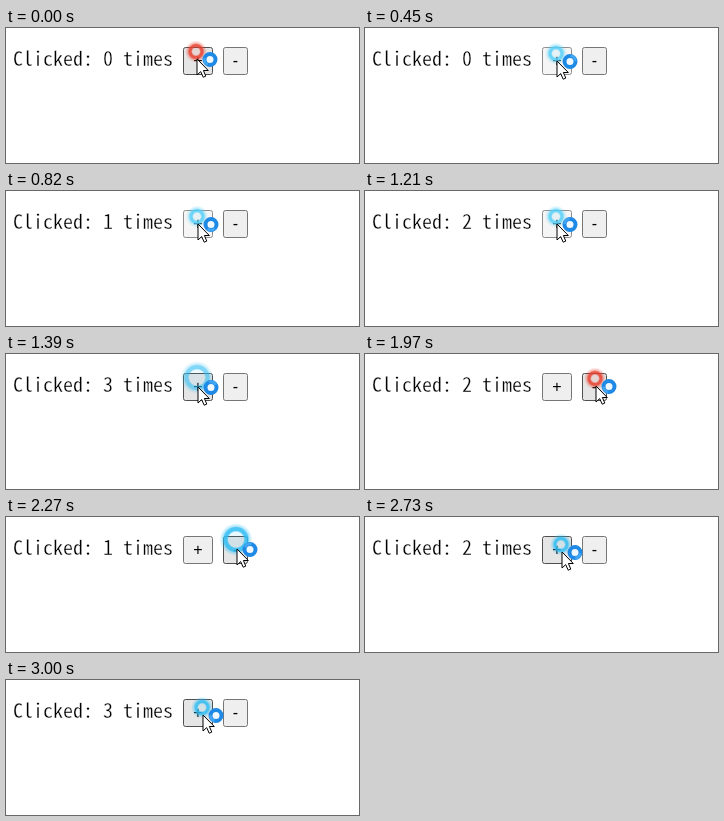
Recreate the animation shown at these times as an HTML page with a canvas. Size 353 by 135 pixels, loop 3.03 s.

```html
<!DOCTYPE html>
<html lang="en">
<head>
<meta charset="utf-8">
<title>Counter</title>
<style>
html, body { margin: 0; width: 100%; height: 100%; overflow: hidden; background: #fff; }
canvas { display: block; width: 353px; height: 135px; }
</style>
</head>
<body>
<canvas id="stage" width="353" height="135"></canvas>
<script>
const ctx = document.getElementById('stage').getContext('2d');
const LOOP = 3030;
const MONO = '"Noto Sans Mono CJK JP", "Noto Sans Mono", monospace';
const FADE = 200;

// Press time, release time, step added to the counter on release
const clicks = [
  [430, 525, 1], [810, 905, 1], [1200, 1290, 1], [1660, 1755, -1],
  [2130, 2225, -1], [2630, 2715, 1], [2900, 2985, 1]
];

// Pointer tip: time, x, y
const path = [
  [0, 191, 31], [150, 191, 31], [300, 192, 33], [1380, 192, 33], [1600, 229, 32],
  [1760, 229, 32], [1860, 231, 32], [2330, 231, 32], [2540, 197, 35], [LOOP, 197, 35]
];

const looks = {
  idle: { fill: '#efefef', edge: '#767676' },
  hover: { fill: '#e5e5e5', edge: '#4f4f4f' },
  down: { fill: '#f5f5f5', edge: '#8d8d8d' }
};

const ease = u => u * u * (3 - 2 * u);
const clamp = u => Math.max(0, Math.min(1, u));

// Keep the 10px advance whichever mono face is available.
ctx.font = '20px ' + MONO;
const textFont = '300 ' + (200 / ctx.measureText('0').width) + 'px ' + MONO;

function pointerAt(t) {
  const i = Math.max(1, path.findIndex(p => p[0] > t));
  const [a, b] = [path[i - 1], path[i]];
  const u = ease((t - a[0]) / (b[0] - a[0]));
  return [1, 2].map(k => Math.round(a[k] + (b[k] - a[k]) * u));
}

function label(text) {
  ctx.font = textFont;
  ctx.textAlign = 'left';
  ctx.fillStyle = '#000';
  ctx.fillText(text, 7, 38);
  // A hairline in the page colour thins the strokes.
  ctx.strokeStyle = '#fff';
  ctx.lineWidth = 0.35;
  ctx.lineJoin = 'round';
  ctx.strokeText(text, 7, 38);
}

function button(x, w, sign, px, down) {
  const over = px >= x && px < x + w;
  const look = looks[over ? (down ? 'down' : 'hover') : 'idle'];
  ctx.beginPath();
  ctx.roundRect(x + 0.5, 19.5, w - 1, 27, 2);
  ctx.fillStyle = look.fill;
  ctx.fill();
  ctx.strokeStyle = look.edge;
  ctx.lineWidth = 1;
  ctx.stroke();
  ctx.fillStyle = '#000';
  ctx.font = '16px "Liberation Sans", Arial, sans-serif';
  ctx.textAlign = 'center';
  ctx.fillText(sign, x + w / 2, 38);
}

// Ring with a soft glow; grow runs from 0 (small) to 1 (burst).
function halo(x, y, grow, rgb, alpha) {
  const inner = 3.5 + 4 * grow, outer = 11 + 5.5 * grow;
  const g = ctx.createRadialGradient(x, y, 0, x, y, outer);
  const stop = (r, a) => g.addColorStop(r / outer, `rgba(${rgb},${a * alpha})`);
  stop(0, 0.08);
  stop(inner, 0.12);
  stop(inner + 1.4, 0.85);
  stop(inner + 3.4 + grow, 0.85);
  stop(inner + 4.8 + grow, 0.35);
  stop(outer, 0);
  ctx.fillStyle = g;
  ctx.beginPath();
  ctx.arc(x, y, outer, 0, Math.PI * 2);
  ctx.fill();
}

function spinner(x, y, t) {
  const arc = (w, color, from, to) => {
    ctx.beginPath();
    ctx.arc(x, y, 5.5, from, to);
    ctx.lineWidth = w;
    ctx.strokeStyle = color;
    ctx.stroke();
  };
  const a = t / LOOP * Math.PI * 6 + 2;
  ctx.fillStyle = '#eef8fe';
  ctx.beginPath();
  ctx.arc(x, y, 4, 0, Math.PI * 2);
  ctx.fill();
  arc(4, '#1f8ae6', 0, Math.PI * 2);
  arc(2.6, 'rgba(90,185,250,0.6)', a, a + 1.4);
}

function arrow(x, y) {
  const pts = [[0, 0], [0, 16], [3.7, 12.6], [6.2, 18.2], [8.8, 17.1], [6.4, 11.5], [11.3, 11.5]];
  ctx.beginPath();
  pts.forEach(([dx, dy]) => ctx.lineTo(x + dx, y + dy));
  ctx.closePath();
  ctx.fillStyle = '#fff';
  ctx.fill();
  ctx.strokeStyle = '#000';
  ctx.lineWidth = 1;
  ctx.lineJoin = 'miter';
  ctx.stroke();
}

function draw(t) {
  const count = clicks.reduce((n, [, up, step]) => n + (t >= up ? step : 0), 0);
  const last = clicks.filter(c => t >= c[0]).pop();
  const since = last ? t - last[1] : FADE;
  const down = since < 0;
  const [x, y] = pointerAt(t);

  ctx.fillStyle = '#fff';
  ctx.fillRect(0, 0, 353, 135);
  label(`Clicked: ${count} times`);
  button(177, 30, '+', x, down);
  button(217, 25, '-', x, down);

  const grow = ease(clamp((since - 15) / 30));
  if (since < FADE) {
    const alpha = 1 - clamp((since - 60) / (FADE - 60));
    halo(x - 1, y - 7.5 - 2 * grow, grow, down ? '85,208,248' : '45,188,242', alpha);
  } else {
    halo(x - 1, y - 7.5, 0, '232,62,44', 1);
  }
  spinner(x + 13, y + 0.5, t);
  arrow(x, y);
}

const start = performance.now();
function frame() {
  draw((performance.now() - start) % LOOP);
  requestAnimationFrame(frame);
}
draw(0);
requestAnimationFrame(frame);
</script>
</body>
</html>
```
